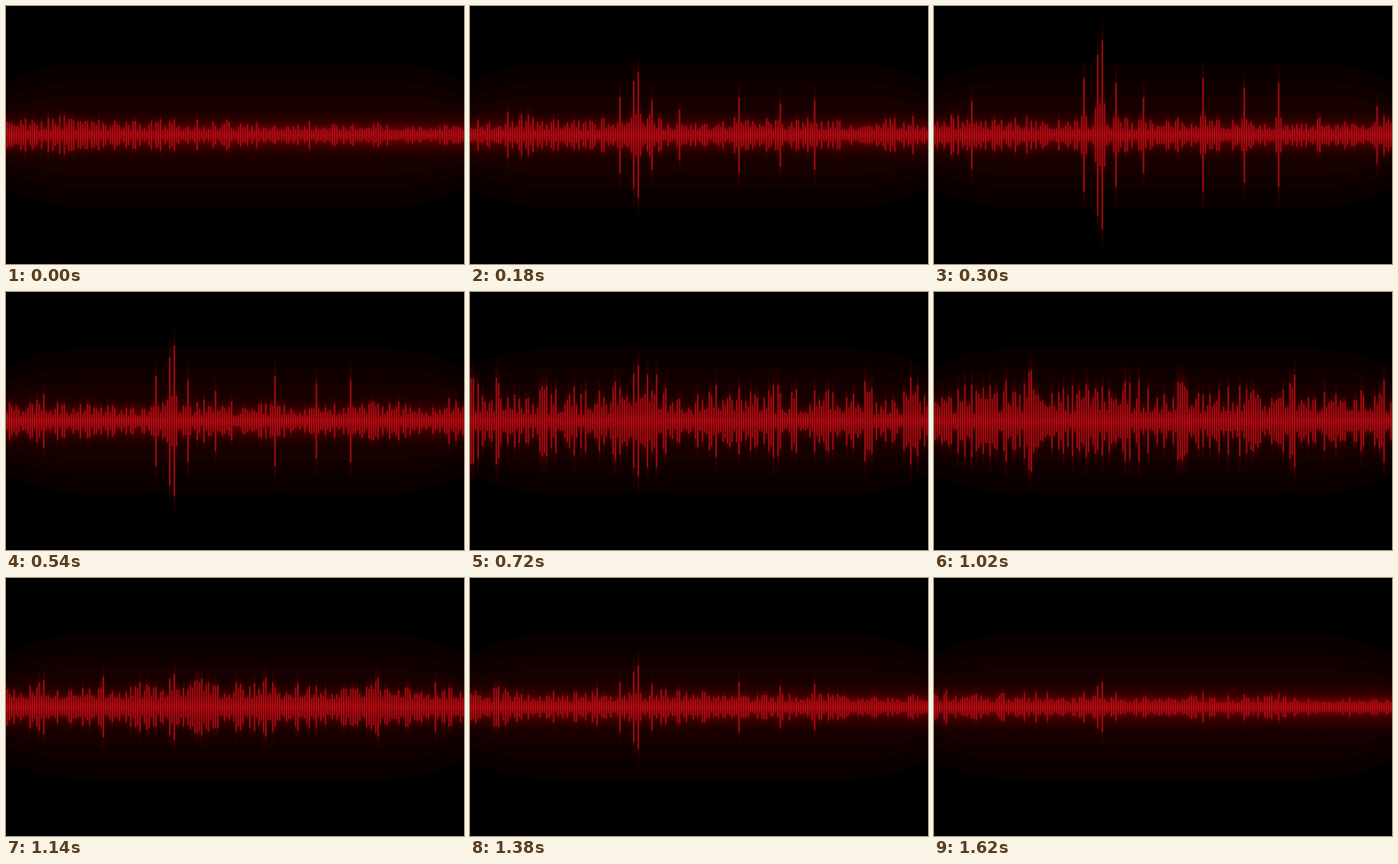
Recreate the animation shown at these times as an HTML page with a canvas. Size 640x360 px, loop 1650 ms.

```html
<!DOCTYPE html>
<html lang="en">
<head>
<meta charset="utf-8">
<title>Red spectrum</title>
<style>
  html, body { margin: 0; height: 100%; overflow: hidden; background: #000; }
  canvas { display: block; }
</style>
</head>
<body>
<canvas id="stage" width="640" height="360"></canvas>
<script>
const ctx = document.getElementById('stage').getContext('2d');
const LOOP = 1650, STEP = 60, BARS = 200, PITCH = 3.2, MID = 180;

// The sound over time: noise floor and level, resonance strength,
// and how much quieter the right side is.
const moods = [
  { step: 0, floor: 6, level: 22, pulse: 22, tilt: .7 },
  { step: 5, floor: 7, level: 27, pulse: 132, tilt: .2 },
  { step: 9, floor: 7, level: 27, pulse: 105, tilt: .2 },
  { step: 15, floor: 10, level: 82, pulse: 50, tilt: 0 },
  { step: 19, floor: 11, level: 30, pulse: 46, tilt: .15 },
  { step: 23, floor: 7, level: 20, pulse: 58, tilt: .45 },
  { step: 27, floor: 6, level: 16, pulse: 35, tilt: .55 }
];

// Frequencies that ring whenever the sound pulses.
const resonances = [
  { x: 53, gain: .36 }, { x: 209, gain: .6 }, { x: 228, gain: .85 },
  { x: 235, gain: 1 }, { x: 255, gain: .55 }, { x: 293, gain: .4 },
  { x: 377, gain: .6 }, { x: 434, gain: .5 }, { x: 482, gain: .55 },
  { x: 618, gain: .3 }
];

const mix = (a, b, k) => a + (b - a) * k;

function random(a, b) {
  const n = Math.sin(a * 127.1 + b * 311.7 + 7.3) * 43758.5453;
  return n - Math.floor(n);
}

function smoothNoise(x, seed) {
  const i = Math.floor(x), f = x - i;
  return mix(random(i, seed), random(i + 1, seed), f * f * (3 - 2 * f));
}

function moodAt(step) {
  const next = Math.max(1, moods.findIndex(m => m.step >= step));
  const a = moods[next - 1], b = moods[next];
  const k = (step - a.step) / (b.step - a.step);
  const between = key => mix(a[key], b[key], k);
  return {
    floor: between('floor'), level: between('level'),
    pulse: between('pulse'), tilt: between('tilt')
  };
}

function barHeight(i, step, { floor, level, pulse, tilt }) {
  const swell = .45 + .75 * smoothNoise(i / 6, step + 50);
  const noise = floor + level * (1 - tilt * i / BARS) * swell * random(i, step) ** 1.4;
  const rings = resonances.map(({ x, gain }) =>
    pulse * gain * Math.exp(-1.1 * Math.abs(i - Math.round(x / PITCH - .5))));
  return Math.max(noise, ...rings);
}

// Vertical gradient mirrored around the middle line.
function mirrorFill(reach, stops) {
  const g = ctx.createLinearGradient(0, MID - reach, 0, MID + reach);
  for (const [distance, color] of stops) {
    const offset = Math.min(1, distance / reach) / 2;
    g.addColorStop(.5 - offset, color);
    g.addColorStop(.5 + offset, color);
  }
  return g;
}

function capsule(half, fill) {
  ctx.beginPath();
  ctx.roundRect(-50, MID - half, 740, 2 * half, [{ x: 160, y: half }]);
  ctx.fillStyle = fill;
  ctx.fill();
}

function drawGlow(level) {
  capsule(101, '#0a0000');
  capsule(74, '#110000');
  capsule(54, '#160000');
  ctx.globalAlpha = Math.min(1, 1.2 - level / 90);
  capsule(40, mirrorFill(40, [
    [40, 'rgba(30,0,0,0)'], [26, '#240000'], [16, '#3a0000'],
    [9, '#5a0003'], [4, '#7c0007'], [0, '#880009']
  ]));
  ctx.globalAlpha = 1;
}

function drawBar(i, h) {
  const x = (i + .5) * PITCH, reach = h + Math.min(h * .5, 22 + h * .1);
  ctx.fillStyle = mirrorFill(reach, [
    [reach, 'rgba(100,0,0,0)'], [h, 'rgba(105,0,2,.42)'],
    [h * .5, 'rgba(105,0,4,.45)'], [0, 'rgba(130,2,8,.75)']
  ]);
  ctx.fillRect(x - 1.6, MID - reach, 3.2, 2 * reach);
  ctx.fillStyle = mirrorFill(h, [
    [h, 'rgb(158,10,15)'], [12, 'rgb(164,11,17)'], [0, 'rgb(180,13,20)']
  ]);
  ctx.fillRect(x - 1, MID - h, 2, 2 * h);
}

function draw() {
  const step = Math.floor(performance.now() % LOOP / STEP);
  const mood = moodAt(step);
  ctx.fillStyle = '#000';
  ctx.fillRect(0, 0, 640, 360);
  drawGlow(mood.level);
  for (let i = 0; i < BARS; i++) drawBar(i, barHeight(i, step, mood));
  requestAnimationFrame(draw);
}
draw();
</script>
</body>
</html>
```
